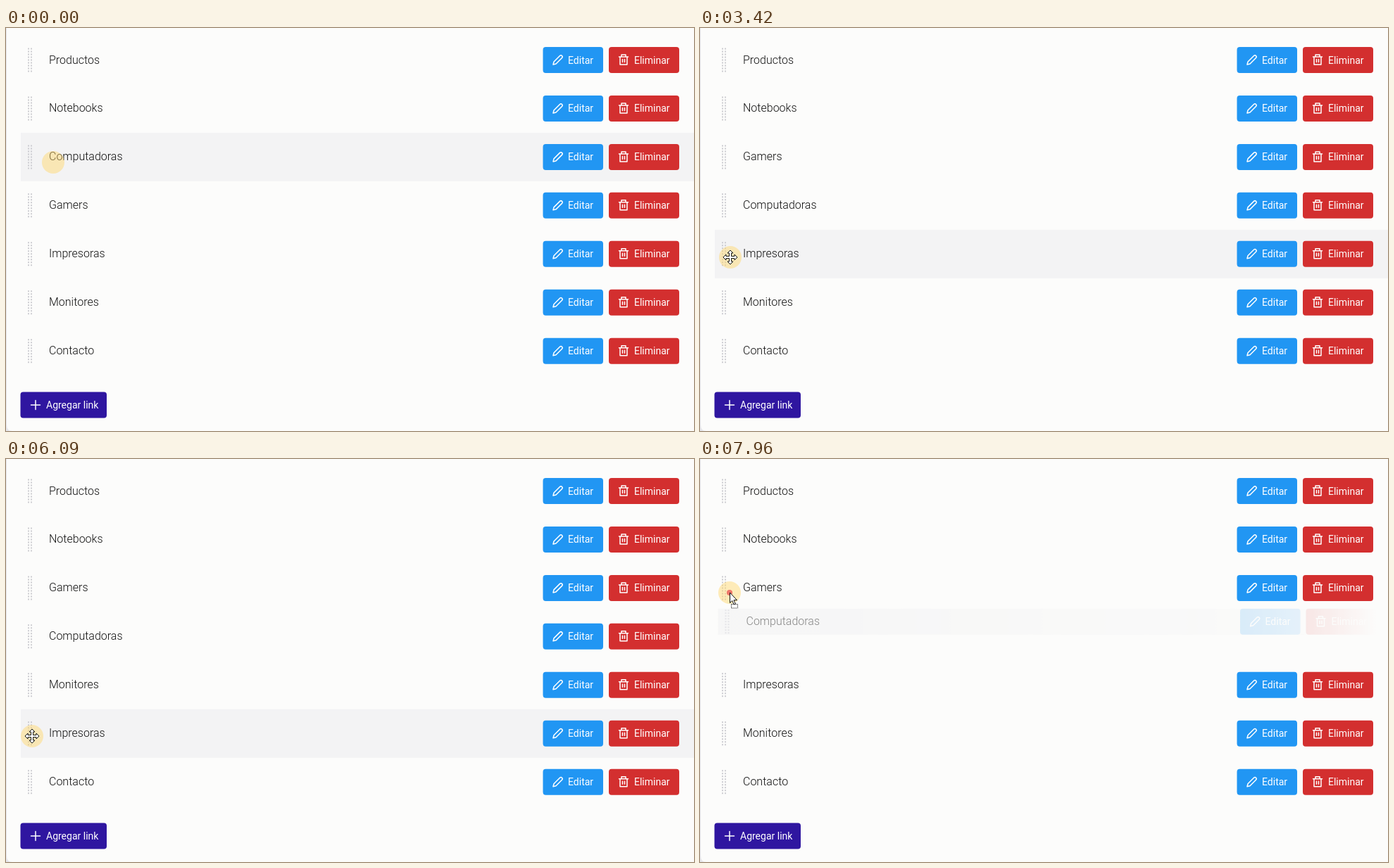
An HTML page that plays this animation: 977x573 px, repeating every 8 s.

```html
<!DOCTYPE html>
<html lang="es">
<head>
<meta charset="utf-8">
<title>Ordenar links</title>
<style>
  html, body { margin: 0; height: 100%; overflow: hidden; background: #e6e6ea; }
  svg { display: block; width: 100%; height: 100%; }
  text { font: 400 14px Roboto, sans-serif; fill: #fff; }
  .name { font-size: 16px; font-weight: 300; fill: #111; }
  .icon { fill: none; stroke: #fff; stroke-width: 1.5; stroke-linejoin: round; stroke-linecap: round; }
  .grip { stroke: #cdcdd2; stroke-width: 2; stroke-dasharray: 2 2; }
  .pointer { fill: #fff; stroke: #111; stroke-width: 1; }
</style>
</head>
<body>
<svg viewBox="0 0 977 573">
  <defs>
    <linearGradient id="fade" gradientUnits="userSpaceOnUse" x1="0" x2="977" y1="0" y2="0">
      <stop offset="0" stop-color="#fff" stop-opacity=".5"/>
      <stop offset=".17" stop-color="#fff" stop-opacity=".5"/>
      <stop offset=".78" stop-color="#fff" stop-opacity=".16"/>
      <stop offset=".88" stop-color="#fff" stop-opacity=".1"/>
      <stop offset=".98" stop-color="#fff" stop-opacity="0"/>
    </linearGradient>
    <mask id="ghostMask" maskUnits="userSpaceOnUse" x="0" y="-19" width="977" height="38">
      <rect y="-19" width="977" height="38" fill="url(#fade)"/>
    </mask>
  </defs>
  <path d="M1 0H977V573H9Q1 573 1 564Z" fill="#fcfcfb"/>
  <rect id="hover" x="21" width="956" height="69" fill="#f3f3f4"/>
  <g id="rows"></g>
  <rect x="20.5" y="517.5" width="122.5" height="37" rx="4" fill="#2f16a0"/>
  <path class="icon" d="M35.5 536H48.5M42 529.5V542.5"/>
  <text x="57" y="541">Agregar link</text>
  <g id="ghost" mask="url(#ghostMask)">
    <rect x="21" y="-18.5" width="956" height="37" fill="#f1f1f2"/>
    <use id="ghostItem"/>
  </g>
  <g id="cursor">
    <circle r="16" fill="#ffd666" fill-opacity=".45"/>
    <circle id="press" fill="#e5393f" fill-opacity=".65"/>
    <circle id="release" fill="none" stroke="#e5393f" stroke-width="4"/>
    <path id="move" class="pointer" d="M0-10L4-6H1.5V-1.5H6V-4L10 0L6 4V1.5H1.5V6H4L0 10L-4 6H-1.5V1.5H-6V4L-10 0L-6-4V-1.5H-1.5V-6H-4Z"/>
    <g id="arrow" class="pointer">
      <rect id="dragBox" x="2.5" y="16.5" width="9" height="5.5" stroke-dasharray="1 1"/>
      <path d="M.5 0V14.5L3.8 11.5 6.2 17 8.4 16 6 10.7H10.5Z"/>
    </g>
  </g>
</svg>
<script>
const LOOP = 8000, PITCH = 68.95, FIRST_Y = 45.5, ROW_TOP = 11.2;
const DRAG_DELAY = 80, DROP_DELAY = 100, GHOST_LAG = 80;
const names = ['Productos', 'Notebooks', 'Computadoras', 'Gamers', 'Impresoras', 'Monitores', 'Contacto'];

// time, x, y
const path = [
  [0, 67, 191], [300, 62, 196], [900, 38, 205], [1370, 37, 206], [1510, 42, 216.5], [1590, 42.5, 222],
  [2100, 42, 262], [2380, 41, 268], [2700, 41, 268], [3200, 43, 326], [3420, 43, 326], [3600, 32, 326.5],
  [4000, 33, 350], [4600, 34, 412], [4840, 34, 412], [5200, 36, 400], [5700, 37, 394], [6090, 37, 394],
  [6300, 36, 370], [6600, 34, 325], [6760, 33, 322], [7090, 18.5, 231], [7300, 17, 236], [7670, 30, 252],
  [7845, 37, 240], [7880, 41.5, 219], [7960, 42, 190], [8000, 42, 186]
];
// each swap exchanges a row with the next one
const swaps = [[1720, 2], [4300, 4], [6450, 4]];
const drags = [[1370, 2380], [3600, 4760], [6030, 6760], [7845, 9000]];

const el = id => document.getElementById(id);
const show = (id, on) => el(id).setAttribute('display', on ? 'inline' : 'none');
const place = (node, x, y) => node.setAttribute('transform', `translate(${x} ${y})`);
const rowY = i => FIRST_Y + i * PITCH;
const rowAt = y => Math.floor((y - ROW_TOP) / PITCH);

const itemMarkup = (name, i) => `<g><g id="item${i}">
  <path class="grip" d="M32-17V18M36-17V18"/>
  <text class="name" x="61" y="5">${name}</text>
  <rect x="762.5" y="-18.5" width="85.5" height="37" rx="4" fill="#2196f3"/>
  <path class="icon" d="M777 6.5L778 2.5 786.5-6Q788-7.5 789.5-6T789.5-3L781 5.5Z"/>
  <text x="798" y="5">Editar</text>
  <rect x="856" y="-18.5" width="100" height="37" rx="4" fill="#d32f2f"/>
  <path class="icon" d="M870.5-4.5H883.5M874-4.5V-7.5H880V-4.5M872-4.5V6.5H882V-4.5M875.5-1V3M878.5-1V3"/>
  <text x="892" y="5">Eliminar</text>
</g></g>`;
el('rows').innerHTML = names.map(itemMarkup).join('');
const rows = [...el('rows').children];

function cursorAt(t) {
  const k = Math.max(1, path.findIndex(p => p[0] >= t));
  const [t0, x0, y0] = path[k - 1], [t1, x1, y1] = path[k];
  const u = (t - t0) / (t1 - t0), e = u * u * (3 - 2 * u);
  return [x0 + (x1 - x0) * e, y0 + (y1 - y0) * e];
}

function orderAt(t) {
  const order = names.map((_, i) => i);
  for (const [time, i] of swaps)
    if (t >= time) [order[i], order[i + 1]] = [order[i + 1], order[i]];
  return order;
}

function draw(t) {
  const [x, y] = cursorAt(t), order = orderAt(t);
  const drag = drags.find(([down, up]) => t >= down + DRAG_DELAY && t < up + DROP_DELAY);
  let hoverRow = rowAt(y), dragged = -1;

  show('ghost', drag);
  if (drag) {
    const [grabX, grabY] = cursorAt(drag[0]), [lagX, lagY] = cursorAt(t - GHOST_LAG);
    hoverRow = rowAt(grabY);
    dragged = orderAt(drag[0])[hoverRow];
    el('ghostItem').setAttribute('href', '#item' + dragged);
    place(el('ghost'), lagX - grabX, rowY(hoverRow) + lagY - grabY);
  }

  order.forEach((item, i) => {
    place(rows[item], 0, rowY(i));
    rows[item].setAttribute('visibility', 'visible');
    rows[item].setAttribute('display', item === dragged ? 'none' : 'inline');
  });
  show('hover', order[hoverRow] !== dragged);
  el('hover').setAttribute('y', rowY(hoverRow) - 34.5);

  place(el('cursor'), x, y);
  show('arrow', drag || x < 21);
  show('dragBox', drag);
  show('move', !drag && x >= 21 && x < 50);

  const held = drags.find(([down, up]) => t >= down && t < up);
  el('press').setAttribute('r', held ? 7 * Math.min(1, (t - held[0]) / 200) : 0);
  const freed = drags.find(([, up]) => t >= up && t < up + 250);
  show('release', freed);
  if (freed) {
    const age = t - freed[1];
    el('release').setAttribute('r', 7 + age / 25);
    el('release').setAttribute('opacity', .65 * (1 - age / 250));
  }
}

function tick(now) {
  draw(now % LOOP);
  requestAnimationFrame(tick);
}
draw(0);
requestAnimationFrame(tick);
</script>
</body>
</html>
```
